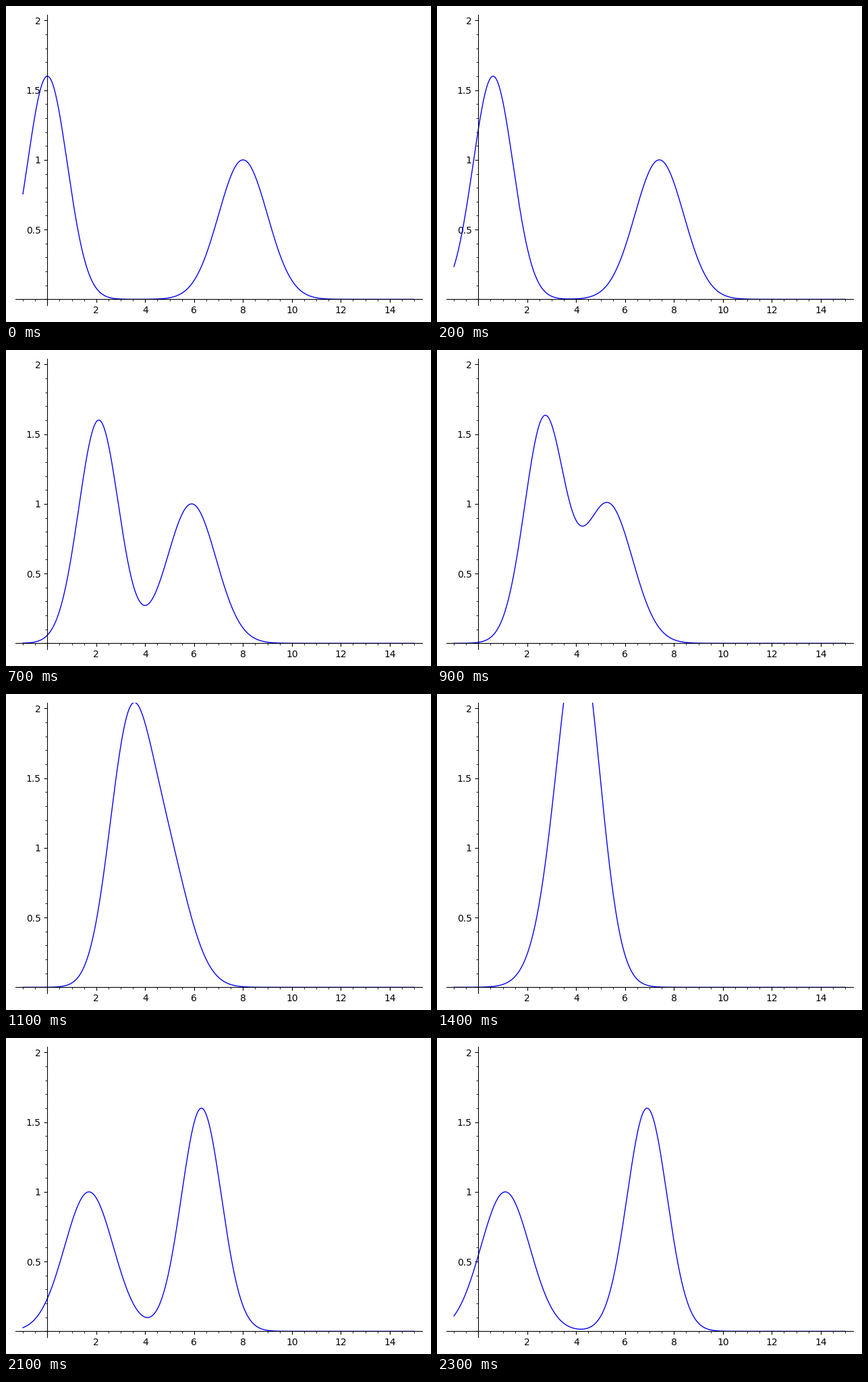
Write a matplotlib script that moves like this. It is 630 by 468 pixels and loops after 2400 ms.

```python
import numpy as np
import matplotlib.pyplot as plt
from matplotlib.animation import FuncAnimation
from matplotlib.ticker import AutoMinorLocator, FuncFormatter, MultipleLocator

W, H, DPI = 630, 468, 100
FRAMES, INTERVAL = 24, 100
STEP = 0.3  # distance each pulse travels per frame

plt.rcParams.update({"font.family": "DejaVu Sans", "font.size": 10})

fig = plt.figure(figsize=(W / DPI, H / DPI), dpi=DPI, facecolor="white")
left, right, top, bottom = 13.5, 616.6, 13.1, 442.65
ax = fig.add_axes([left / W, 1 - bottom / H,
                   (right - left) / W, (bottom - top) / H])
ax.set_xlim(-1.32, 15.32)
ax.set_ylim(-0.04, 2.04)

# Axes cross at the origin
for side in ("top", "right"):
    ax.spines[side].set_visible(False)
for side in ("left", "bottom"):
    ax.spines[side].set_position("zero")

label = FuncFormatter(lambda v, pos: f"{v:g}" if abs(v) > 1e-9 else "")
for axis, major, parts in ((ax.xaxis, 2, 4), (ax.yaxis, 0.5, 5)):
    axis.set_major_locator(MultipleLocator(major))
    axis.set_minor_locator(AutoMinorLocator(parts))
    axis.set_major_formatter(label)

x = np.linspace(-1, 15, 801)
curve, = ax.plot([], [], color=(0, 0, 1), lw=1)


def pulses(shift):
    """Tall pulse moving right plus a wide one moving left."""
    tall = 1.6 * np.exp(-0.75 * (x - shift) ** 2)
    wide = np.exp(-0.5 * (x - 8 + shift) ** 2)
    return tall + wide


def draw(i):
    curve.set_data(x, pulses(STEP * i))
    return curve,


anim = FuncAnimation(fig, draw, frames=FRAMES, interval=INTERVAL,
                     repeat=True, repeat_delay=0)
plt.show()
```
